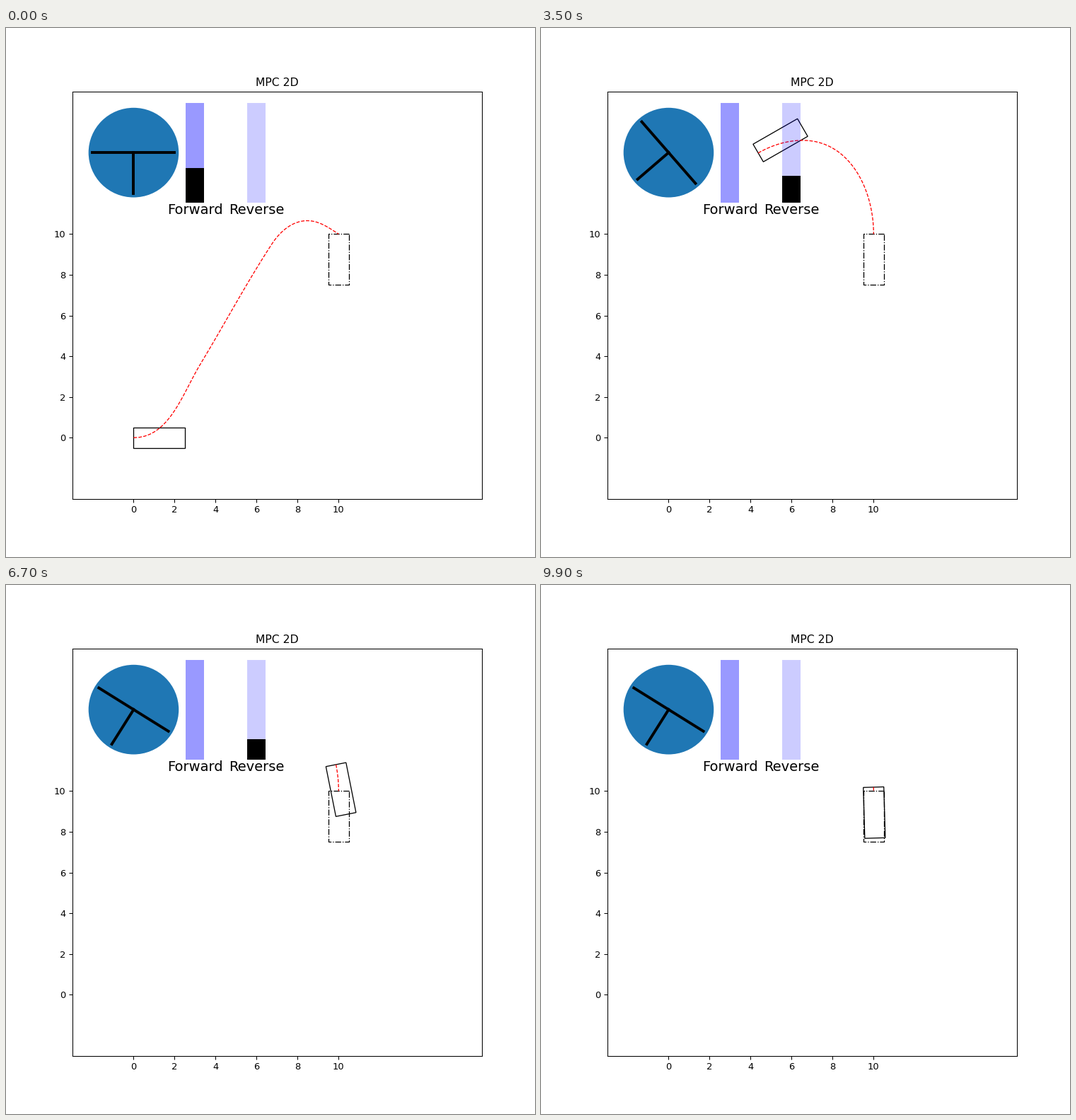
Write a matplotlib script that moves like this. It is 748 by 748 pixels and loops after 10000 ms.

```python
import numpy as np
import matplotlib.pyplot as plt
from matplotlib.animation import FuncAnimation
from matplotlib.patches import Circle, Rectangle

plt.rcParams["path.simplify"] = False

FRAMES, INTERVAL = 100, 100
CAR_W, CAR_L = 1.0, 2.5
WHEEL = (0, 14)
BARS = (3, 6)
BAR_Y = 12

# Poses are (x, y, heading in degrees)
GOAL = (10, 10, -90)
# step, x, y, heading, speed per step
ROUTE = [
    (11, 2.10, 1.10, 55.4, 0.445),
    (23, 3.19, 7.42, 102, 0.62),
    (29, 2.57, 11.0, 84, 0.60),
    (35, 4.37, 13.98, 30, 0.51),
    (58, 9.62, 12.23, -71, 0.14),
]
TURN_STEP, APEX_STEP = 28, 40
# The first plan heads almost straight for the goal
ROUGH = [(3.26, 3.62, 59), (6.75, 9.52, 57), (8.6, 10.65, -5), (10, 10, -33)]

# Control key points: steps, values
STEER = ((9, 11, 23, 28, 35, 47, 58, 67),
         (1.57, 1.02, 0.263, -1.42, -0.857, -1.08, -0.707, -0.56))
PEDAL = ((8, 11, 23, 35, 58, 78, 95), (1, 0.83, 0.27, -0.51, -0.18, -0.03, 0))


def heading(deg):
    return np.array([np.cos(np.radians(deg)), np.sin(np.radians(deg))])


def hermite(u, p0, p1, m0, m1):
    return ((2 * u**3 - 3 * u**2 + 1) * p0 + (u**3 - 2 * u**2 + u) * m0
            + (3 * u**2 - 2 * u**3) * p1 + (u**3 - u**2) * m1)


def position(n):
    """Full lock from rest, then the waypoints, then a decaying glide."""
    if n < 11:
        a = np.radians(55.4) * (n / 11) ** 2
        return 2.547 * np.array([np.sin(a), 1 - np.cos(a)])
    if n >= 58:
        q = np.exp(-0.06 * (n - 58))
        return np.array([10 - 0.38 * q**2, 10 + 2.23 * q])
    for (t0, *p0, h0, v0), (t1, *p1, h1, v1) in zip(ROUTE, ROUTE[1:]):
        if n < t1:
            dt = t1 - t0
            return hermite((n - t0) / dt, np.array(p0), np.array(p1),
                           dt * v0 * heading(h0), dt * v1 * heading(h1))


def pose(n):
    x, y = position(n)
    dx, dy = position(n + 0.01) - (x, y)
    return x, y, np.degrees(np.arctan2(dy, dx))


def arcs(poses, samples=72):
    """Arc-like curve through the poses."""
    t = np.linspace(0, len(poses) - 1, samples)
    seg = np.minimum(t.astype(int), len(poses) - 2)
    parts = []
    for i, ((*p0, h0), (*p1, h1)) in enumerate(zip(poses, poses[1:])):
        p0, p1 = np.array(p0), np.array(p1)
        pull = np.hypot(*(p1 - p0)) / np.cos(np.radians(h1 - h0) / 4) ** 2
        u = (t[seg == i] - i)[:, None]
        parts.append(hermite(u, p0, p1, pull * heading(h0),
                             pull * heading(h1)))
    return np.vstack(parts)


def plan(n):
    car = pose(n)
    stops = [car]
    if n < TURN_STEP:
        x, y, h = pose(TURN_STEP)
        stops.append((x + np.interp(n, (11, 23), (0.45, 0)), y, h))
    if n < APEX_STEP:
        steps = (11, 23, 35)
        stops.append((np.interp(n, steps, (6.57, 6.2, 6.55)),
                      np.interp(n, steps, (13.64, 14.2, 14.6)), 0))
    line = arcs(stops + [GOAL])
    if n < 11:
        line += (1 - n / 11) * (arcs([car] + ROUGH) - line)
    return line


def place(rect, x, y, deg):
    """Put the middle of the rear edge at (x, y)."""
    c, s = heading(deg)
    rect.set_xy((x - s * CAR_W / 2, y + c * CAR_W / 2))
    rect.angle = deg - 90


fig = plt.figure(figsize=(8, 8), dpi=93.5)
ax = fig.add_subplot(111)
ax.set(xlim=(-3, 17), ylim=(-3, 17), title="MPC 2D",
       xticks=range(0, 11, 2), yticks=range(0, 11, 2))

car_box = Rectangle((0, 0), CAR_W, CAR_L, fill=False)
goal_box = Rectangle((0, 0), CAR_W, CAR_L, fill=False, ls="dashdot")
place(goal_box, *GOAL)
for patch in (car_box, goal_box, Circle(WHEEL, 2.2)):
    ax.add_patch(patch)

forecast, = ax.plot([], [], "r--", lw=1)
spokes = [ax.plot([], [], "k", lw=3)[0] for _ in range(3)]
pedals = []
for x, alpha, label in zip(BARS, (0.4, 0.2), ("Forward", "Reverse")):
    ax.plot([x, x], [BAR_Y, BAR_Y + 4], "b", lw=20, alpha=alpha)
    pedals.append(ax.plot([], [], "k", lw=20)[0])
    ax.text(x, 11, label, fontsize=15, ha="center")


def update(n):
    place(car_box, *pose(n))
    forecast.set_data(*plan(n).T)

    steer = np.interp(n, *STEER) if n else 0
    cx, cy = WHEEL
    for spoke, a in zip(spokes, (steer, steer + np.pi, steer - np.pi / 2)):
        spoke.set_data([cx, cx + 2 * np.cos(a)], [cy, cy + 2 * np.sin(a)])

    push = np.interp(n, *PEDAL)
    for bar, x, value in zip(pedals, BARS, (push, -push)):
        if value > 0:
            bar.set_data([x, x], [BAR_Y, BAR_Y + 0.8 * value])
        else:
            bar.set_data([], [])
    return [car_box, forecast, *spokes, *pedals]


anim = FuncAnimation(fig, update, frames=FRAMES, interval=INTERVAL,
                     init_func=lambda: update(0), repeat=True,
                     repeat_delay=0)
plt.show()
```
